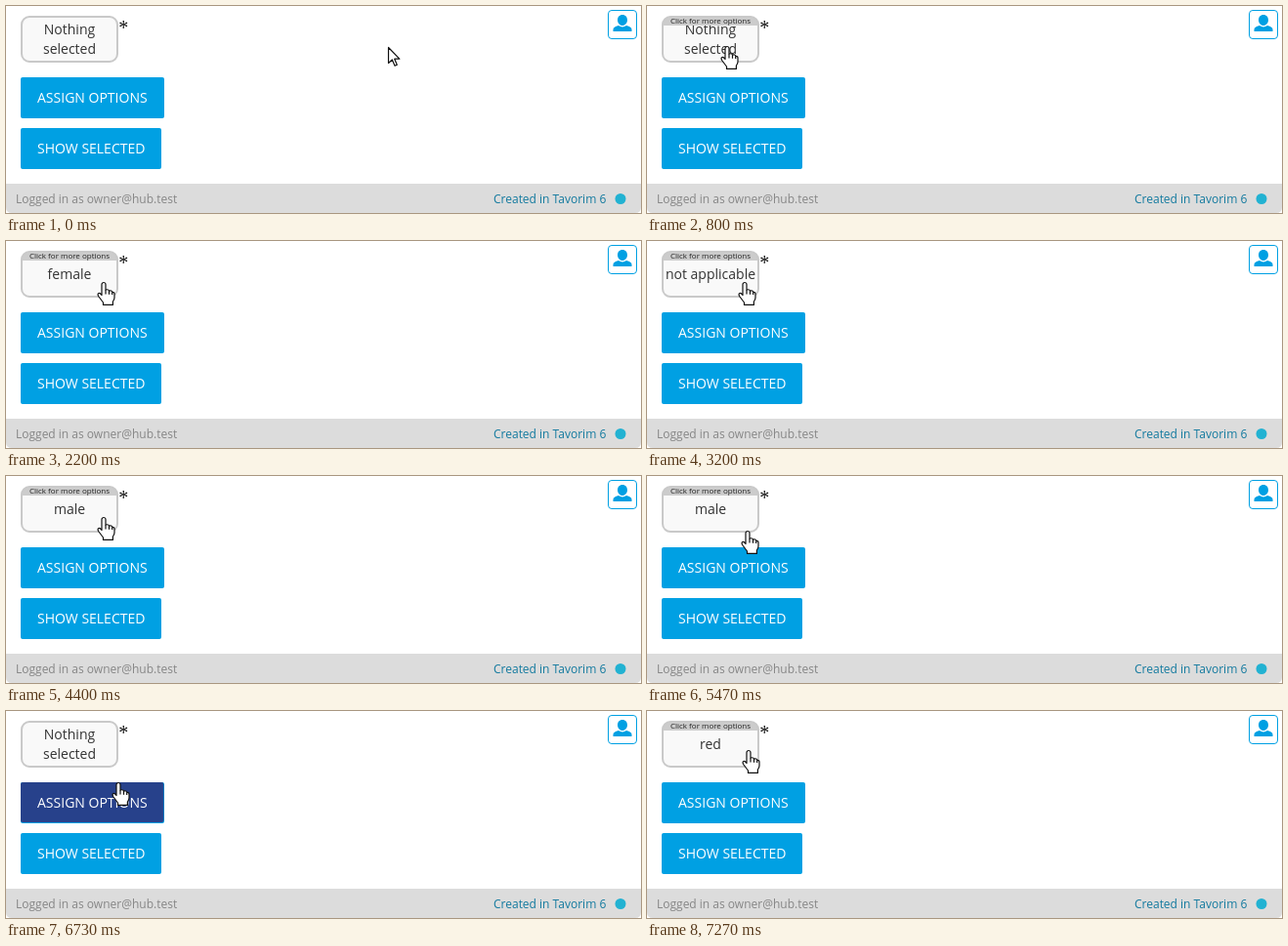
An HTML page that plays this animation: 650x212 px, repeating every 8 s.

```html
<!DOCTYPE html>
<html lang="en">
<head>
<meta charset="utf-8">
<title>Option toggle</title>
<style>
  html, body { margin: 0; width: 100%; height: 100%; overflow: hidden; background: #fff; }
  svg { display: block; width: 650px; height: 212px; font: 14px "Open Sans", sans-serif; fill: #333; }
  .mid { text-anchor: middle; }
  .btn { fill: #00a0e3; }
  .caption { fill: #fff; }
  .small { font-size: 12px; }
  .pointer { fill: #fff; stroke: #111; stroke-width: 1.2; stroke-linejoin: round; }
</style>
</head>
<body>
<svg viewBox="0 0 650 212">
  <clipPath id="inside"><rect x="16" y="11" width="98" height="46" rx="8"/></clipPath>

  <rect x="16" y="11" width="98" height="46" rx="8" fill="#f9f9f9"/>
  <g class="mid">
    <text id="line1" x="65" y="29"></text>
    <text id="line2" x="65" y="49"></text>
  </g>
  <g id="tip">
    <rect x="15" y="10" width="100" height="10" fill="#ccc" clip-path="url(#inside)"/>
    <text class="mid" x="65" y="18.4" font-size="8" fill="#222">Click for more options</text>
  </g>
  <rect x="16" y="11" width="98" height="46" rx="8" fill="none" stroke="#c9c9c9" stroke-width="2"/>
  <text class="mid" x="120.3" y="28.6" style="font:20px 'Liberation Serif',serif" fill="#111">*</text>

  <rect class="btn" x="15" y="73" width="147" height="42" rx="2"/>
  <rect id="hover" x="15" y="73" width="146.4" height="41" rx="2" fill="#27418b"/>
  <text class="caption" x="32" y="99">ASSIGN OPTIONS</text>
  <rect class="btn" x="15" y="125" width="144" height="42" rx="2"/>
  <text class="caption" x="32" y="151">SHOW SELECTED</text>

  <rect x="616.5" y="4.5" width="29" height="29" rx="3.5" fill="#fff" stroke="#00a0e3"/>
  <path class="btn" d="M631 9c3.2 0 5 2.3 5 5.200 0 3.200-2.200 5.800-5 5.800s-5-2.600-5-5.800c0-2.900 1.800-5.200 5-5.200zM621.500 26v-2q0-2.500 5.500-4 4 2.800 8 0 5.500 1.500 5.500 4v2z"/>

  <path d="M0 182H650V206q0 6-6 6H6q-6 0-6-6z" fill="#dcdcdc"/>
  <text class="small" x="10" y="202" fill="#868686">Logged in as owner@hub.test</text>
  <text class="small" x="499" y="202" fill="#137a9f">Created in Tavorim 6</text>
  <circle cx="629" cy="197.500" r="5.500" fill="#22b2d2"/>

  <path id="arrow" class="pointer" d="M.5.5V16.500L4.300 13 7 19.200 9.300 18.200 6.700 12.200H11.800z"/>
  <g id="hand" class="pointer">
    <path d="M-2 2.500a2 2 0 0 1 4 0V8q3-.8 3.600 1 2.800-.6 3.200 1.300 2.200-.2 2.200 2V16q0 2-1.600 4V23.400H-.5V21L-5.400 14.500q-1.200-2.500.3-3 1.400-.4 3.100 2z"/>
    <path fill="none" d="M2 8v4.500M5.500 9v3.800M8.700 10.300v2.800"/>
  </g>
</svg>
<script>
const LOOP = 8000, STEPS = 120;
const $ = id => document.getElementById(id);

// Pointer hot spot: [step, x, y]
const path = [
  [0, 391, 42], [12, 82, 41], [16, 82, 41], [22, 99, 42], [25, 99, 42], [26, 100, 42],
  [79, 100, 42], [87, 109, 87], [89, 109, 90], [98, 109, 90], [101, 115, 73], [106, 104, 40], [120, 104, 40]
];
// Box label: [first step, lines]
const labels = [
  [0, "Nothing", "selected"], [17, "male"], [33, "female"], [48, "not applicable"],
  [66, "male"], [92, "Nothing", "selected"], [109, "red"]
];

function pointerAt(step) {
  const i = path.findIndex(p => p[0] > step);
  const [s0, x0, y0] = path[i - 1], [s1, x1, y1] = path[i];
  const u = (step - s0) / (s1 - s0), e = u * u * (3 - 2 * u);
  return [Math.round(x0 + (x1 - x0) * e), Math.round(y0 + (y1 - y0) * e)];
}

const within = (x, y, l, t, r, b) => x >= l && x < r && y >= t && y < b;
const show = (id, on) => $(id).setAttribute("visibility", on ? "visible" : "hidden");

function draw(step) {
  const [x, y] = pointerAt(step);
  const onBox = within(x, y, 15, 10, 115, 58);
  const onButton = within(x, y, 15, 73, 162, 115);
  const [, first, second = ""] = labels.filter(l => l[0] <= step).pop();

  $("line1").textContent = first;
  $("line1").setAttribute("y", second ? 29 : 39);
  $("line2").textContent = second;
  show("tip", onBox);
  show("hover", onButton);
  show("hand", onBox || onButton);
  show("arrow", !onBox && !onButton);
  for (const id of ["hand", "arrow"]) $(id).setAttribute("transform", `translate(${x} ${y})`);
}

const start = performance.now();
let last = -1;
function tick() {
  const t = (performance.now() - start) % LOOP;
  // The picture advances 15 times a second
  const step = Math.min(STEPS - 1, Math.floor(t * STEPS / LOOP + 0.06));
  if (step !== last) draw(last = step);
  requestAnimationFrame(tick);
}
tick();
</script>
</body>
</html>
```
